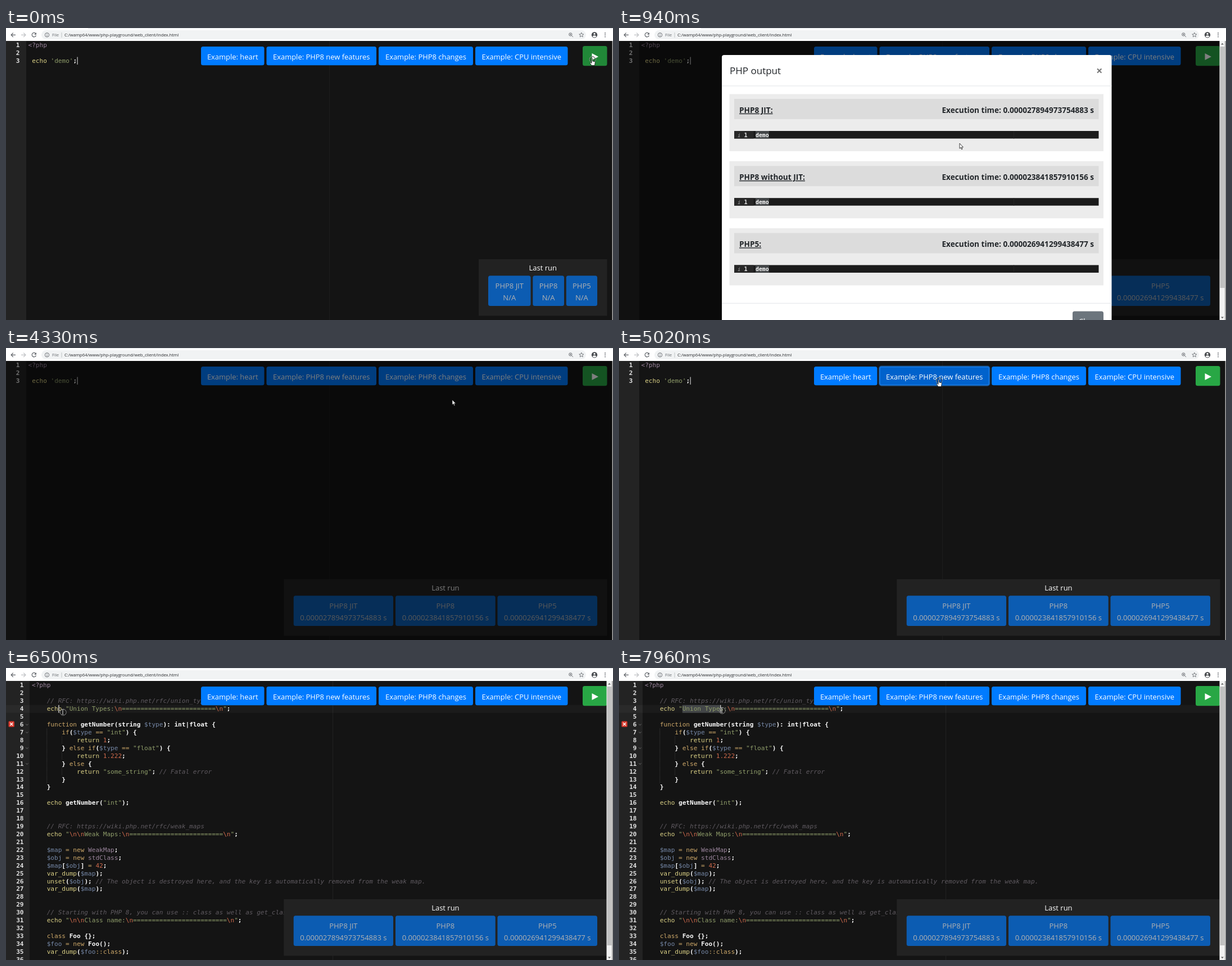
Recreate the animation shown at these times as an HTML page. Size 1080x519 px, loop 8000 ms.

```html
<!DOCTYPE html>
<html lang="en">
<head>
<meta charset="utf-8">
<title>PHP playground</title>
<style>
html, body { margin: 0; width: 100%; height: 100%; overflow: hidden; background: #141414; }
svg { display: block; width: 100%; height: 100%; }
text { font-family: "Open Sans", "Noto Sans", sans-serif; font-size: 13px; white-space: pre; }
.mono { font-family: "DejaVu Sans Mono", monospace; font-size: 11.08px; }
.url { font-size: 7.7px; }
.bold { font-weight: 700; font-size: 13.6px; }
</style>
</head>
<body>
<svg id="stage" viewBox="0 0 1080 519"></svg>
<script>
const LOOP = 8000, CHAR = 6.67, LINE = 13.926;
const stage = document.getElementById('stage');

function el(tag, attrs, parent, text) {
  const node = document.createElementNS('http://www.w3.org/2000/svg', tag);
  for (const k in attrs) node.setAttribute(k, attrs[k]);
  if (text !== undefined) node.textContent = text;
  parent.appendChild(node);
  return node;
}
const group = parent => el('g', {}, parent);
const rect = (p, x, y, x2, y2, fill, rx = 0) =>
  el('rect', { x, y, width: x2 - x, height: y2 - y, fill, rx }, p);
const label = (p, x, y, text, fill, more) => el('text', { x, y, fill, ...more }, p, text);
const path = (p, d, stroke, width = 1, fill = 'none') =>
  el('path', { d, stroke, 'stroke-width': width, fill }, p);
const show = (node, on) => node.setAttribute('display', on ? 'inline' : 'none');
const center = { 'text-anchor': 'middle' };

// ---- syntax colouring ----
const COLOR = { comment: '#5f5a60', string: '#8f9d6a', escape: '#cf6a4c', variable: '#7587a6',
  number: '#cf6a4c', call: '#dad085', keyword: '#cda869', support: '#9b859d', plain: '#f8f8f8' };
const TOKENS = new RegExp([
  '(?<comment>//.*)', '(?<string>"[^"]*"|\'[^\']*\')', '(?<variable>\\$\\w+)',
  '(?<number>\\b\\d[\\d.]*)', '(?<call>\\b(?:echo|return|var_dump|unset)\\b)',
  '(?<keyword>\\b(?:function|if|else|new|class)\\b|==?|::)',
  '(?<support><\\?php|\\bWeakMap\\b|\\bstdClass\\b)', '(?<plain>\\w+|[^\\s\\w])'
].join('|'), 'g');

function codeLine(p, x, y, line) {
  const put = (col, text, kind) => {
    const t = label(p, x + col * CHAR, y, text, COLOR[kind], { class: 'mono' });
    if (kind === 'plain') t.setAttribute('font-weight', 700);
    if (kind === 'comment') t.setAttribute('font-style', 'italic');
  };
  for (const m of line.matchAll(TOKENS)) {
    const kind = Object.keys(m.groups).find(k => m.groups[k] !== undefined);
    if (kind !== 'string') { put(m.index, m[0], kind); continue; }
    let col = m.index;
    for (const part of m[0].split(/(\\n)/)) {
      if (part) put(col, part, part === '\\n' ? 'escape' : 'string');
      col += part.length;
    }
  }
}
const lineTop = n => 24 + (n - 1) * LINE;
const baseline = n => lineTop(n) + 10.4;

function lines(p, x, numberX, source) {
  source.forEach((s, i) => {
    label(p, numberX, baseline(i + 1), i + 1, '#e2e2e2',
      { class: 'mono', 'font-weight': 700, 'text-anchor': 'end' });
    codeLine(p, x, baseline(i + 1), s);
  });
}

// ---- first editor ----
const demo = group(stage);
rect(demo, 0, 23, 1080, 519, '#141414');
rect(demo, 0, 23, 36, 519, '#232323');
rect(demo, 575, 23, 576, 519, '#1d1d1d');
lines(demo, 39.5, 24.5, ['<?php', '', " echo 'demo';"]);
rect(demo, 126.5, 51.5, 127.7, 65, '#c8c8c8');

// ---- second editor ----
const rule = '='.repeat(25);
const SOURCE = `<?php

    // RFC: https://wiki.php.net/rfc/union_types_v2
    echo "Union Types:\\n${rule}\\n";

    function getNumber(string $type): int|float {
        if($type == "int") {
            return 1;
        } else if($type == "float") {
            return 1.222;
        } else {
            return "some_string"; // Fatal error
        }
    }

    echo getNumber("int");


    // RFC: https://wiki.php.net/rfc/weak_maps
    echo "\\n\\nWeak Maps:\\n${rule}\\n";

    $map = new WeakMap;
    $obj = new stdClass;
    $map[$obj] = 42;
    var_dump($map);
    unset($obj); // The object is destroyed here, and the key is automatically removed from the weak map.
    var_dump($map);


    // Starting with PHP 8, you can use :: class as well as get_class()
    echo "\\n\\nClass name:\\n${rule}\\n";

    class Foo {};
    $foo = new Foo();
    var_dump($foo::class);
`.split('\n');
const CODE_X = 46;
const editor = group(stage);
rect(editor, 0, 23, 1080, 519, '#141414');
rect(editor, 0, 23, 42, 519, '#232323');
const selectAll = rect(editor, CODE_X, 23, 1068, 519, '#3c4043');
const activeLine = group(editor);
rect(activeLine, 0, lineTop(4), 42, lineTop(5), '#2a2a2a');
rect(activeLine, 42, lineTop(4), 1068, lineTop(5), '#1b1b1b');
const selection = rect(editor, CODE_X + 10 * CHAR, lineTop(4), 180, lineTop(5), '#434648');
rect(editor, 581, 23, 582, 519, '#ffffff').setAttribute('opacity', .06);
const guide = (col, a, b) => el('path', { d: `M${CODE_X + col * CHAR} ${lineTop(a)}V${lineTop(b + 1)}`,
  stroke: '#777', 'stroke-width': .7, 'stroke-dasharray': '1 1', opacity: .6 }, editor);
guide(4, 7, 13);
[8, 10, 12].forEach(n => guide(8, n, n));
lines(editor, CODE_X, 31.5, SOURCE);
[6, 7, 9, 11].forEach(n => path(editor, `M35.2 ${lineTop(n) + 6}l2.2 2l2.2 -2`, '#777', .9));
const caret = rect(editor, 0, lineTop(4), 1.4, lineTop(5), '#d0d0d0');
const errorIcon = group(editor);
rect(errorIcon, 4.5, 94.5, 14.8, 104.8, '#d8382c', 1.5);
path(errorIcon, 'M7.2 97.2l5 5m0 -5l-5 5', '#fff', 1.5);

// ---- page buttons ----
const tools = group(stage);
const exampleButtons = [
  [347, 459.5, 'heart'], [463.5, 659, 'PHP8 new features'],
  [663, 831, 'PHP8 changes'], [835, 999.5, 'CPU intensive']
].map(([x, x2, name]) => {
  const box = rect(tools, x, 33, x2, 66.3, '#007bff', 3.5);
  label(tools, (x + x2) / 2, 55.6, 'Example: ' + name, '#fff', { ...center, style: 'font-size:12.95px' });
  return box;
});
const features = exampleButtons[1];
const runButton = rect(tools, 1026, 32, 1069.5, 67.2, '#28a745', 3.5);
path(tools, 'M1042.5 45L1054 51L1042.5 57Z', 'none', 0, '#fff');

function lastRun(x, boxes) {
  const g = group(stage);
  rect(g, x, 411, 1069.5, 511.5, '#222');
  label(g, (x + 1069.5) / 2, 431, 'Last run', '#fff', center);
  boxes.forEach(([a, b, name, value]) => {
    rect(g, a, 440.3, b, 494, '#0c5cb2', 3.5);
    label(g, (a + b) / 2, 462.6, name, '#b2b2b2', center);
    label(g, (a + b) / 2, 483.6, value, '#b2b2b2', center);
  });
  return g;
}
const times = ['0.000027894973754883 s', '0.000023841857910156 s', '0.000026941299438477 s'];
const emptyPanel = lastRun(841, [[858, 933.5, 'PHP8 JIT', 'N/A'], [937.3, 993, 'PHP8', 'N/A'], [996.8, 1052, 'PHP5', 'N/A']]);
const fullPanel = lastRun(494.3, [[511.7, 689, 'PHP8 JIT', times[0]], [693, 870.7, 'PHP8', times[1]], [874.5, 1052, 'PHP5', times[2]]]);

// ---- result dialog ----
const backdrop = rect(stage, 0, 23, 1080, 519, '#000');
const modal = group(stage);
rect(modal, 183, 48, 876.5, 580, '#fff', 4);
label(modal, 197, 82.3, 'PHP output', '#212529', { style: 'font-size:17px' });
const closeMark = label(modal, 854.7, 82.6, '×', '#777', { ...center, 'font-weight': 700, style: 'font-size:20px' });
rect(modal, 183, 102.5, 876.5, 103.4, '#dee2e6');
rect(modal, 183, 488.8, 876.5, 489.7, '#dee2e6');
rect(modal, 807, 503.5, 862, 537, '#6c757d', 3.5);
label(modal, 834.5, 525.5, 'Close', '#fff', center);

const outputs = ['PHP8 JIT:', 'PHP8 without JIT:', 'PHP5:'].map((name, i) => {
  const g = el('g', { transform: `translate(0 ${i * 119.2})` }, modal);
  rect(g, 196.5, 117.5, 862, 219, '#ececec');
  rect(g, 205, 126, 853.5, 162, '#dcdcdc');
  label(g, 214, 150.8, name, '#212529', { class: 'bold', 'text-decoration': 'underline' });
  label(g, 845, 150.8, 'Execution time: ' + times[i], '#212529', { class: 'bold', 'text-anchor': 'end' });
  rect(g, 205, 183, 853.5, 196.5, '#1b1b1b');
  rect(g, 205, 183, 239.5, 196.5, '#272727');
  rect(g, 702, 183, 703, 196.5, '#232323');
  label(g, 211, 193.5, 'i', '#aaa', { class: 'mono', 'font-style': 'italic', style: 'font-size:9px' });
  label(g, 222.5, 193.5, '1', '#e2e2e2', { class: 'mono', 'font-weight': 700, style: 'font-size:10px' });
  const marked = rect(g, 243, 183, 267, 196.5, '#434648');
  label(g, 243, 193.5, 'demo', '#f8f8f8', { class: 'mono', 'font-weight': 700, style: 'font-size:9.8px' });
  const cursor = rect(g, 255, 183, 256.3, 196.5, '#d0d0d0');
  return { marked, cursor };
});

// ---- scrollbar and browser bar ----
const scrollbar = group(stage);
rect(scrollbar, 1068.5, 23, 1078.5, 519, '#f1f1f1');
const thumb = rect(scrollbar, 1069.5, 33, 1077.5, 462, '#c1c1c1');
path(scrollbar, 'M1071 29.5h5l-2.5 -2.7z', 'none', 0, '#606060');
path(scrollbar, 'M1071 513.5h5l-2.5 2.7z', 'none', 0, '#606060');
rect(stage, 1078.6, 23, 1080, 519, '#b8b8b8');

const bar = group(stage);
rect(bar, 0, 0, 1080, 23, '#fff');
rect(bar, 146, 0, 1080, 1, '#dee1e6');
rect(bar, 63, 4, 1032, 20.5, '#f1f3f4', 8.2);
path(bar, 'M17 12.3H9.3M12.8 8.6L9.1 12.3L12.8 16', '#5f6368', 1.2);
path(bar, 'M27 12.3H34.7M31.2 8.6L34.9 12.3L31.2 16', '#bfc1c4', 1.2);
path(bar, 'M52.6 9.6A3.7 3.7 0 1 0 53.4 13.2', '#5f6368', 1.2);
path(bar, 'M54 8v3.8h-3.8z', 'none', 0, '#5f6368');
const ring = (p, cx, cy, r, stroke, width = .9) =>
  el('circle', { cx, cy, r, fill: 'none', stroke, 'stroke-width': width }, p);
ring(bar, 73, 12.3, 3.7, '#5f6368');
path(bar, 'M73 11.7V14.5M73 9.9V10.8', '#5f6368', .9);
label(bar, 82, 15.2, 'File', '#6a6e73', { class: 'url' });
rect(bar, 98.6, 8, 99.4, 17, '#b5b8bc');
label(bar, 104, 15.2, 'C:/wamp64/www/php-playground/web_client/index.html', '#27292c', { class: 'url' });
ring(bar, 1004.3, 11.4, 2.7, '#5f6368');
path(bar, 'M1006.3 13.4L1009 16.1M1003 11.4h2.6M1004.3 10.1v2.6', '#5f6368', .9);
const star = Array.from({ length: 10 }, (_, i) => {
  const a = i * Math.PI / 5, r = i % 2 ? 1.9 : 4.3;
  return `${1023.8 + r * Math.sin(a)} ${12.4 - r * Math.cos(a)}`;
});
path(bar, `M${star.join('L')}Z`, '#5f6368', .8);
el('circle', { cx: 1047, cy: 12.2, r: 5.2, fill: '#4a4d51' }, bar);
el('circle', { cx: 1047, cy: 10.4, r: 1.6, fill: '#fff' }, bar);
path(bar, 'M1043.7 15.2C1044.5 12.6 1049.5 12.6 1050.3 15.2C1048.8 16.9 1045.2 16.9 1043.7 15.2Z', 'none', 0, '#fff');
[9, 12.3, 15.6].forEach(cy => el('circle', { cx: 1066, cy, r: .95, fill: '#5f6368' }, bar));

// ---- mouse pointer, tip at 0,0 ----
const pointer = group(stage);
const clickRing = group(pointer);
ring(clickRing, .7, .7, 5.4, '#ccc', .8);
ring(clickRing, .7, .7, 4.7, '#222', .9);
const shapes = {
  arrow: path(pointer, 'M0 0V9.2L2.1 7.3L3.6 10.7L5 10.1L3.6 6.8H6.4Z', '#111', .8, '#fff'),
  hand: path(pointer, 'M-1 0C-1 -1.2 .8 -1.2 .8 0V4L4.3 4.7C5.2 5 5.4 5.6 5.2 6.6L4.4 11.6H-1L-4 7.2C-4.2 6.2 -3 5.8 -2.2 6.6L-1 7.6Z', '#111', .8, '#fff'),
  beam: path(pointer, 'M-1.8 -4.6Q0 -4.6 0 -3.8V3.8Q0 4.6 -1.8 4.6M1.8 -4.6Q0 -4.6 0 -3.8V3.8Q0 4.6 1.8 4.6', '#b8b8b8', .8)
};

const BURSTS = [[140, 940, 7], [1200, 2080, 7], [2350, 3250, 7], [3400, 3650, 3], [4050, 5020, 8],
  [5140, 5270, 2], [5540, 6230, 6], [6500, 6770, 3], [7070, 7680, 5], [7960, 7960, 1]];
const STEPS = [0];
for (const [a, b, n] of BURSTS)
  for (let i = 0; i < n; i++) STEPS.push(a + (n > 1 ? (b - a) * i / (n - 1) : 0));
const held = t => STEPS.filter(s => s <= t + 6).pop();

const ROUTE = [[0, 1043, 55], [270, 1043, 55], [940, 606, 205], [1060, 606, 205], [1640, 370, 300],
  [1930, 256, 316], [2080, 256, 316], [2200, 256, 316], [2500, 345, 402], [2650, 470, 420], [2950, 720, 380],
  [3100, 861, 250], [3250, 844, 129], [3300, 844, 129], [3650, 853, 75], [4050, 853, 75], [4327, 794, 92],
  [4600, 680, 82], [5020, 569, 57], [5420, 569, 57], [6230, 101, 78], [6940, 101, 78], [7090, 112, 81],
  [7680, 183, 75], [LOOP, 183, 75]];
const SHAPES = [[0, 'hand'], [270, 'arrow'], [1780, 'beam'], [2490, 'arrow'], [3640, 'hand'],
  [4180, 'arrow'], [4735, 'hand'], [5670, 'beam']];
const CLICKS = [[0, 140], [1930, 2075], [4045, 4180], [5015, 5135], [6495, 6630], [7955, LOOP]];

const ramp = (t, a, b) => Math.min(1, Math.max(0, (t - a) / (b - a)));
const within = (t, a, b) => t >= a && t < b;
const ease = x => 1 - (1 - x) ** 2;

function route(t) {
  const i = Math.max(1, ROUTE.findIndex(k => k[0] >= t));
  const [t0, x0, y0] = ROUTE[i - 1], [t1, x1, y1] = ROUTE[i];
  const k = ramp(t, t0, t1);
  return [x0 + (x1 - x0) * k, y0 + (y1 - y0) * k];
}

function render(time) {
  const t = held(time);
  const [x, y] = route(t);

  const loaded = t >= 5135;
  show(demo, !loaded);
  show(editor, loaded);
  show(emptyPanel, t < 260);
  show(fullPanel, t >= 260);

  // dialog: backdrop first in, last out
  backdrop.setAttribute('opacity', .5 * (ramp(t, 200, 350) - ramp(t, 4340, 4490)));
  const shown = within(t, 390, 4320);
  const open = ease(ramp(t, 370, 670)) - ease(ramp(t, 4040, 4340));
  show(modal, shown);
  modal.setAttribute('opacity', ramp(t, 370, 520) - ramp(t, 4040, 4200));
  modal.setAttribute('transform', `translate(0 ${-43 * (1 - open)})`);
  closeMark.setAttribute('fill', within(t, 3640, 4320) ? '#404040' : '#777');
  show(outputs[1].marked, t < 1925);
  outputs.forEach((o, i) => show(o.cursor, i === 1 && t >= 1925));
  show(scrollbar, shown || loaded);
  thumb.setAttribute('height', loaded ? 460 : 429);

  // buttons
  runButton.setAttribute('fill', t < 260 ? '#218838' : '#28a745');
  const focused = within(t, 5015, 6490);
  features.setAttribute('fill', focused ? '#0062cc' : within(t, 4735, 6490) ? '#0069d9' : '#007bff');
  features.setAttribute('stroke', focused ? 'rgba(38,143,255,.5)' : 'none');
  features.setAttribute('stroke-width', 3);

  // second editor: all selected, then a click, then a drag over two words
  show(selectAll, t < 6490);
  show(activeLine, t >= 6490);
  show(errorIcon, t >= 5810);
  const dragging = t >= 7200;
  const col = dragging ? Math.min(20, Math.max(10, Math.round((x - CODE_X) / CHAR))) : 7;
  show(selection, dragging);
  selection.setAttribute('width', Math.max(0, (col - 10) * CHAR));
  show(caret, t >= 6490);
  caret.setAttribute('x', CODE_X + col * CHAR + .5);

  pointer.setAttribute('transform', `translate(${x} ${y})`);
  const shape = SHAPES.filter(s => s[0] <= t).pop()[1];
  for (const name in shapes) show(shapes[name], name === shape);
  show(clickRing, CLICKS.some(([a, b]) => within(t, a, b)));
}

const start = performance.now();
function tick() {
  render((performance.now() - start) % LOOP);
  requestAnimationFrame(tick);
}
tick();
</script>
</body>
</html>
```
